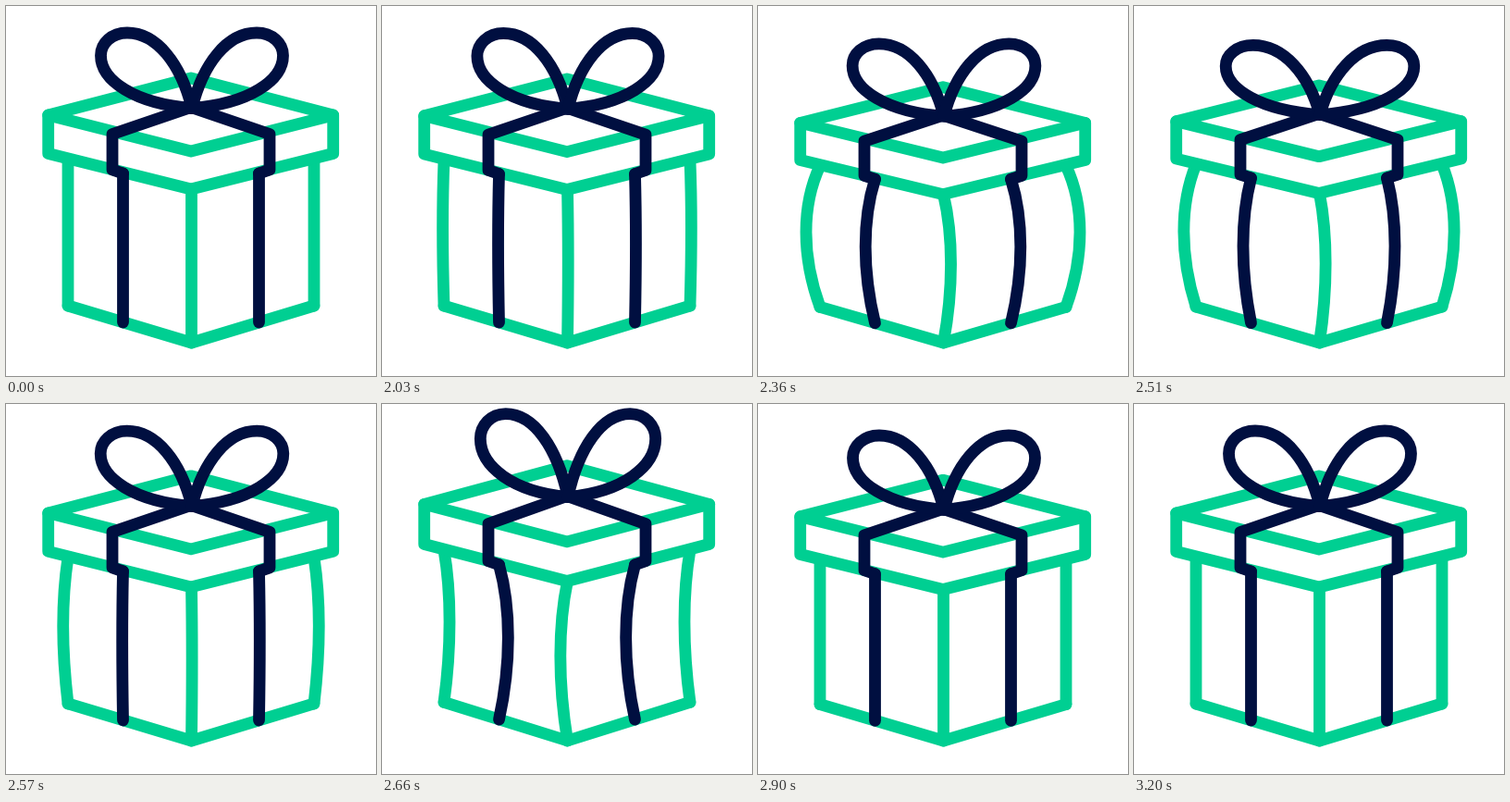
Animation, 400 px wide and 400 px high, one loop 3.23 s. Source, as an HTML page with a canvas:

```html
<!DOCTYPE html>
<html lang="en">
<head>
<meta charset="utf-8">
<title>Gift box</title>
<style>
  html, body { margin: 0; width: 100%; height: 100%; overflow: hidden; background: #fff; }
  canvas { display: block; width: 100vmin; height: 100vmin; }
</style>
</head>
<body>
<canvas id="stage" width="400" height="400"></canvas>
<script>
const ctx = document.getElementById('stage').getContext('2d');
const GREEN = '#00cf92', NAVY = '#000f40';
const LOOP = 3230, START = 2030, STEP = 30, FLOOR = 364;

// Eased progress from 0 to 1 between two times.
function glide(t, from, to) {
  const u = Math.min(1, Math.max(0, (t - from) / (to - from)));
  return (1 - Math.cos(Math.PI * u)) / 2;
}

// The box squashes, springs up, drops back and settles; the bow lags behind.
function poseAt(t) {
  const squash = glide(t, 1980, 2240);
  const flatten = glide(t, 2240, 2460);
  const spring = glide(t, 2470, 2680);
  const drop = glide(t, 2690, 2900);
  const settle = glide(t, 2900, 3110);
  return {
    height: 1 - 0.034 * squash + 0.075 * spring - 0.056 * drop + 0.015 * settle,
    wall: 15 * squash - 21.5 * spring + 6.5 * drop,
    ribbon: 10.3 * squash - 20.6 * spring + 10.3 * drop,
    bow: squash - 1.9 * flatten + 1.8 * spring - 0.9 * drop
  };
}

function draw({ height, wall, ribbon, bow }) {
  const lift = y => FLOOR + (y - FLOOR) * height;

  const line = (points, closed) => {
    ctx.beginPath();
    points.forEach(([x, y]) => ctx.lineTo(x, lift(y)));
    if (closed) ctx.closePath();
    ctx.stroke();
  };

  const upright = (x, top, bottom, bulge) => {
    const at = k => lift(top + (bottom - top) * k);
    const cx = x + bulge * 4 / 3;
    ctx.beginPath();
    ctx.moveTo(x, at(0));
    ctx.bezierCurveTo(cx, at(0.28), cx, at(0.64), x, at(1));
    ctx.stroke();
  };

  const bowLoop = side => {
    const base = lift(110.5);
    const X = x => 201 + side * x * (1 - 0.045 * bow);
    const Y = y => base + y * height * (1 + 0.072 * bow);
    const curve = (a, b, c, d, e, f) =>
      ctx.bezierCurveTo(X(a), Y(b), X(c), Y(d), X(e), Y(f));
    ctx.beginPath();
    ctx.moveTo(X(0), base);
    curve(12, -48, 38, -81.5, 70, -81.5);
    curve(87, -81.5, 98.5, -70, 98.5, -57);
    curve(98.5, -30, 62, -5, 0, 0);
    ctx.stroke();
  };

  ctx.fillStyle = '#fff';
  ctx.fillRect(0, 0, 400, 400);
  ctx.lineWidth = 12.8;
  ctx.lineCap = ctx.lineJoin = 'round';

  ctx.strokeStyle = GREEN;
  upright(67, 166, 324, -wall);
  upright(333, 166, 324, wall);
  upright(200.5, 198, 364, ribbon * 0.78);
  line([[67, 324], [200.5, 364], [333, 324]]);
  line([[200, 78], [353.7, 118], [200, 157], [45.7, 118]], true);
  line([[45.7, 118], [45.7, 159.5], [200, 198], [353.7, 159.5], [353.7, 118]]);

  ctx.strokeStyle = NAVY;
  line([[126.5, 181], [115, 177], [115, 138.5], [200, 109.5],
        [285, 138.5], [285, 177], [273.5, 181]]);
  upright(126.5, 181, 342, -ribbon);
  upright(273.5, 181, 342, ribbon);
  bowLoop(-1);
  bowLoop(1);
}

function tick() {
  const t = performance.now() % LOOP;
  const held = t < START ? 0 : START + Math.floor((t - START) / STEP) * STEP;
  draw(poseAt(held));
  requestAnimationFrame(tick);
}
tick();
</script>
</body>
</html>
```
